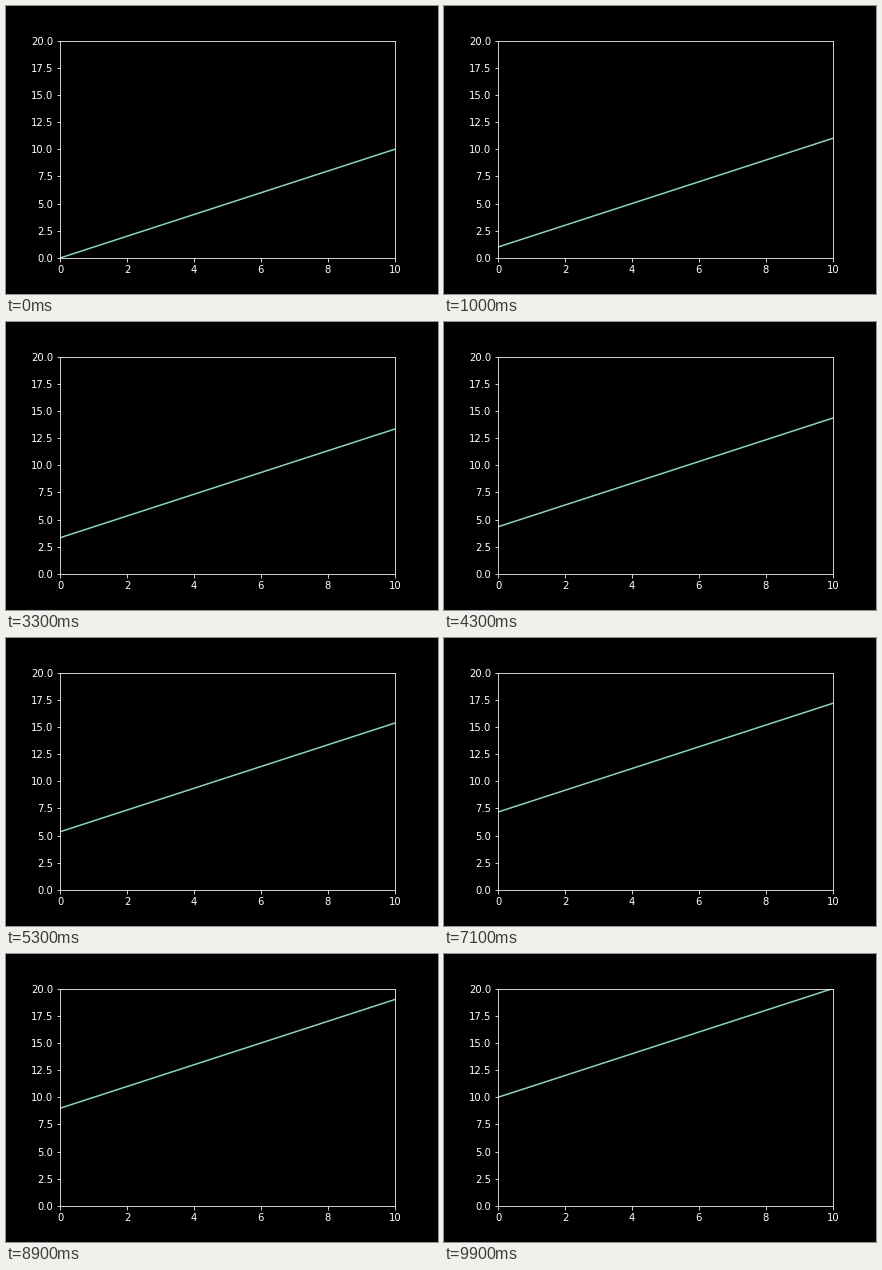
Recreate the animation shown at these times as a matplotlib script. Size 432 px wide and 288 px high, loop 10000 ms.

```python
import numpy as np
import matplotlib.pyplot as plt
from matplotlib.animation import FuncAnimation

FRAMES = 100
INTERVAL = 100  # ms

plt.style.use("dark_background")
plt.rcParams.update({"font.family": "DejaVu Sans", "font.size": 10})

fig, ax = plt.subplots(figsize=(6, 4), dpi=72)
fig.subplots_adjust(left=0.125, right=0.9, bottom=0.125, top=0.88)
ax.set_xlim(0, 10)
ax.set_ylim(0, 20)
ax.set_xticks(np.arange(0, 10.1, 2))
ax.set_yticks(np.arange(0, 20.1, 2.5))

x = np.linspace(0, 10, 100)
line, = ax.plot(x, x, color="#8dd3c7", lw=1.5)


def update(i):
    """Shift the line upward at constant speed, from 0 to 10."""
    line.set_ydata(x + 10 * i / (FRAMES - 1))
    return line,


anim = FuncAnimation(fig, update, frames=FRAMES, interval=INTERVAL,
                     repeat=True, repeat_delay=0)
plt.show()
```
